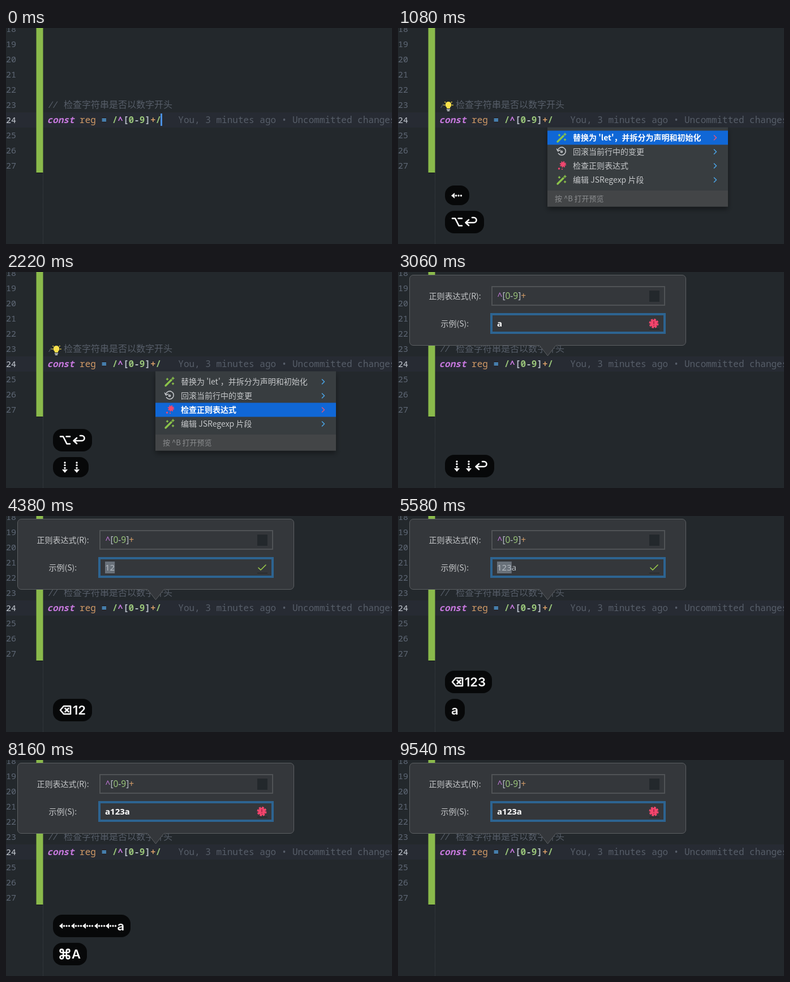
These frames come from a looping animation (682x384 px, 9.78 s). An HTML page:

```html
<!DOCTYPE html>
<html lang="zh-CN">
<head>
<meta charset="utf-8">
<style>
  html, body { margin: 0; width: 100%; height: 100%; overflow: hidden; background: #23282c; }
  #stage { position: absolute; left: 0; top: 0; display: block; }
  text { white-space: pre; font-family: "Noto Sans CJK SC", "Noto Sans CJK", "Noto Sans", sans-serif; font-size: 14px; fill: #c6c8ca; }
  .code text { font-family: "Noto Sans Mono", "Noto Sans CJK SC", "Noto Sans CJK", monospace; font-size: 16px; font-weight: 600; }
  .code text.num { font-size: 15px; font-weight: 500; fill: #5f6876; }
  .code text.current { fill: #c5cad2; }
  .code text.dim { fill: #575e69; font-weight: 400; }
  text.field { font-family: "Noto Sans", sans-serif; font-size: 15px; fill: #b4bac0; }
  .purple { fill: #c678dd; } .orange { fill: #d19a66; } .blue { fill: #56a8ea; }
  .green { fill: #98c379; } .plain { fill: #b4bac4; }
  .line { fill: none; stroke-width: 1.6; stroke-linecap: round; stroke-linejoin: round; }
  #keys { position: absolute; left: 83px; top: 0; height: 365px; display: flex; flex-direction: column;
    justify-content: flex-end; align-items: flex-start; gap: 10px; }
  .pill { display: flex; align-items: center; flex: none; box-sizing: border-box; padding: 0 11px; border-radius: 16px;
    background: #070809; color: #fff; font: 600 22px Inter, sans-serif; }
  .pill svg { display: block; overflow: visible; fill: none; stroke: #fff; stroke-width: 2.6; stroke-linejoin: round; stroke-linecap: round; }
  .pill svg .solid { fill: #fff; stroke: none; }
</style>
</head>
<body>
<svg id="stage" width="682" height="384" viewBox="0 0 682 384">
  <defs>
    <filter id="shadow" x="-10%" y="-10%" width="120%" height="130%">
      <feDropShadow dx="0" dy="5" stdDeviation="5" flood-color="#000" flood-opacity=".4"/>
    </filter>
    <g id="wand" class="line">
      <path d="M-7 7L3 -3" stroke-width="3.4"/>
      <path d="M-4 -6v3M-5.500 -4.500h3M6 -8v4M4 -6h4M6 2v3M4.500 3.500h3"/>
    </g>
  </defs>
  <rect width="682" height="384" fill="#23282c"/>
  <rect y="150" width="682" height="27" fill="#272b33"/>
  <path d="M65.500 257V384" stroke="#3b4146" stroke-dasharray="1 1"/>
  <rect x="53.500" width="12" height="257" fill="#8aba4b"/>
  <rect x="54" y="257" width="11" height="1" fill="#15181a"/>
  <g class="code">
    <g id="numbers"></g>
    <text class="dim" x="73" y="142"><tspan font-style="italic" letter-spacing="-1.500">//</tspan></text>
    <text class="dim" x="102" y="142">检查字符串是否以数字开头</text>
    <text x="72.500" y="169"><tspan class="purple" font-weight="700" font-style="italic">const</tspan><tspan class="orange" font-weight="500"> reg</tspan><tspan class="blue"> = </tspan><tspan class="green">/</tspan><tspan class="purple">^</tspan><tspan class="plain">[</tspan><tspan class="green">0</tspan><tspan class="plain">-</tspan><tspan class="green">9</tspan><tspan class="plain">]</tspan><tspan class="orange">+</tspan><tspan class="green">/</tspan></text>
    <text class="dim" x="304.300" y="169">You, 3 minutes ago • Uncommitted changes</text>
  </g>
  <rect id="caret" y="152" width="3" height="22" fill="#4a90e2"/>

  <g id="menu">
    <rect x="80" y="128" width="19" height="21" fill="#23282c"/>
    <path d="M89 131a5.500 5.500 0 0 1 3 10v2h-6v-2a5.500 5.500 0 0 1 3-10Z" fill="#fbe14c"/>
    <path d="M86.500 145h5M87.500 147.300h3" class="line" stroke="#d5d7d8"/>
    <path d="M81 137h1M96 137h1M83 131.500l.5.500M95 131.500l-.5.500" class="line" stroke="#fbe14c"/>
    <rect x="264" y="176.500" width="319" height="141" fill="#393c3f" filter="url(#shadow)"/>
    <rect x="264" y="289" width="319" height="28.500" fill="#434547"/>
    <rect id="selected" x="264" width="319" height="25" fill="#1067d6"/>
    <g id="items"></g>
    <use href="#wand" x="289" y="195" stroke="#8bc34a"/>
    <use href="#wand" x="289" y="270" stroke="#8bc34a"/>
    <g class="line" stroke="#c3c6c9">
      <path d="M282.500 217a7 7 0 1 1 1 6M280.500 215l2 4 4-2"/>
      <circle cx="289" cy="220" r="1.500"/>
    </g>
    <g fill="#f0476f">
      <circle cx="291.500" cy="242.500" r="4"/>
      <circle cx="291.500" cy="242.500" r="4.500" fill="none" stroke="#f0476f" stroke-width="2.500" stroke-dasharray="1.770"/>
      <circle cx="284.500" cy="250" r="1.700"/>
      <circle cx="290" cy="251" r="1.100"/>
    </g>
    <text x="277" y="308" style="font-size:13px;fill:#8b8d8f">按 ^B 打开预览</text>
  </g>

  <g id="dialog">
    <path d="M27 5.500H502a6.500 6.500 0 0 1 6.500 6.500V124a6.500 6.500 0 0 1-6.500 6.500H279L264.500 149L250 130.500H27a6.500 6.500 0 0 1-6.500-6.500V12a6.500 6.500 0 0 1 6.500-6.500Z" fill="#34373b" stroke="#5c5f62"/>
    <text x="54.500" y="48">正则表达式(R):</text>
    <text x="75.500" y="97">示例(S):</text>
    <rect x="166" y="26" width="305" height="33" fill="#34373b" stroke="#505356" stroke-width="2"/>
    <rect x="444" y="33" width="18" height="20" fill="#23282c"/>
    <text class="field" x="175.500" y="48" style="font-size:15.5px"><tspan class="purple">^</tspan><tspan class="plain">[</tspan><tspan class="green">0</tspan><tspan class="plain">-</tspan><tspan class="green">9</tspan><tspan class="plain">]</tspan><tspan class="orange">+</tspan></text>
    <rect x="165" y="75" width="306" height="33" fill="#34373b" stroke="#2d6491" stroke-width="4"/>
    <rect id="match" x="175" y="81" height="21" fill="#69717a"/>
    <text id="sample" class="field" x="175" y="97"></text>
    <rect id="sampleCaret" x="209" y="83" width="1.500" height="19" fill="#c5cad2"/>
    <path d="M444 101.500h18" stroke="#202326"/>
    <g id="error">
      <circle cx="452" cy="91.500" r="6.500" fill="#f2456c"/>
      <circle cx="452" cy="91.500" r="7" fill="none" stroke="#f2456c" stroke-width="3" stroke-dasharray="3.500 1.998"/>
      <path d="M452 88v4M452 95v.2" class="line" stroke="#9d2444" stroke-width="2"/>
    </g>
    <path id="check" d="M446 92l4 4 9-9" class="line" stroke="#9ccc4a"/>
  </g>
</svg>
<div id="keys"></div>

<script>
const LOOP = 9780, LIFE = 1800, FADE = 150;
const $ = id => document.getElementById(id);
const show = (id, on) => $(id).setAttribute('display', on ? 'inline' : 'none');

const icon = (width, body) => `<svg width="${width}" height="24" viewBox="0 -12 ${width} 24">${body}</svg>`;
const dots = points => points.map(([x, y]) => `<circle class="solid" cx="${x}" cy="${y}" r="1.7"/>`).join('');
const glyphs = {
  '←': icon(20.5, '<path class="solid" d="M0 0L6 -5V5Z"/>' + dots([[8.5, 0], [13, 0], [17.5, 0]])),
  '↓': icon(20.5, '<path class="solid" d="M5 4H15L10 10Z"/>' + dots([[10, -8], [10, -3.5], [10, 1.5]])),
  '↩': icon(24, '<path d="M14 -8h3a4.5 4.5 0 0 1 0 9H3M8 -4L2.5 1L8 6"/>'),
  '⌥': icon(23, '<path d="M2 -6.500h5l6.500 13h5.500M12.500 -6.500h6.500"/>'),
  '⌫': icon(24, '<path d="M8 -7H20V7H8L2 0ZM10.500 -3l6 6m0 -6l-6 6"/>'),
  '⌘': icon(22, '<path d="M7.200 -2.800H4.400a2.800 2.800 0 1 1 2.800 -2.800V5.600a2.800 2.800 0 1 1 -2.800 -2.800H15.600a2.800 2.800 0 1 1 -2.800 2.800V-5.600a2.800 2.800 0 1 1 2.800 2.800Z"/>')
};

// Each pill collects key presses: the key and the time it goes down.
const pills = [
  { '←': [400] },
  { '⌥': [840], '↩': [900] },
  { '↓': [1740, 1860], '↩': [2400] },
  { '⌫': [3420], '1': [4140], '2': [4380], '3': [4620] },
  { 'a': [5400] },
  { '←': [6120, 6300, 6420, 6540, 6720], 'a': [7060] },
  { '⌘': [7740], 'A': [7740] }
].map(keys => Object.entries(keys)
  .flatMap(([key, times]) => times.map(time => ({ key, time })))
  .sort((a, b) => a.time - b.time));

const samples = [[0, 'a'], [3420, ''], [4140, '1'], [4380, '12'], [4620, '123'], [5400, '123a'], [7060, 'a123a']];

function pillHeight(text) {
  return /^←+$/.test(text) ? 35 : /^↓+$/.test(text) ? 36 : 40;
}

function pillHtml(keys, t) {
  const pressed = keys.filter(k => k.time <= t);
  const left = pressed.length ? pressed.at(-1).time + LIFE - t : 0;
  if (left <= 0) return '';
  const text = pressed.map(k => k.key).join('');
  const body = text.replace(/[^\w]|\w+/g, part => glyphs[part] || `<span>${part}</span>`);
  return `<div class="pill" style="height:${pillHeight(text)}px;opacity:${Math.min(1, left / FADE).toFixed(2)}">${body}</div>`;
}

for (let n = 18; n <= 27; n++) {
  $('numbers').innerHTML += `<text class="num ${n === 24 ? 'current' : ''}" x="0" y="${169 + 27 * (n - 24)}">${n}</text>`;
}

const labels = ["替换为 'let'，并拆分为声明和初始化", '回滚当前行中的变更', '检查正则表达式', '编辑 JSRegexp 片段'];
$('items').innerHTML = labels.map((label, i) => {
  const y = 195 + 25 * i;
  return `<text x="309" y="${y + 5}">${label}</text><path class="line" d="M558.5 ${y - 4}l4 4 -4 4"/>`;
}).join('');
const itemTexts = [...$('items').querySelectorAll('text')];
const itemArrows = [...$('items').querySelectorAll('path')];

function drawMenu(t) {
  const open = t >= 1020 && t < 2400;
  show('menu', open);
  if (!open) return;
  const index = (t >= 1740) + (t >= 1860);
  $('selected').setAttribute('y', 182.5 + 25 * index);
  itemTexts.forEach((item, i) => {
    item.style.fontWeight = i === index ? 700 : 400;
    item.style.fill = i === index ? '#fff' : '';
  });
  itemArrows.forEach((arrow, i) => arrow.style.stroke = i === index ? '#e0577f' : '#4ba3e3');
}

function drawDialog(t) {
  show('dialog', t >= 2520);
  const text = samples.findLast(([time]) => time <= t)[1];
  const matched = (text.match(/^[0-9]+/) || [''])[0].length;
  const allSelected = t < 3420 || t >= 7740;
  const sample = $('sample');
  if (sample.textContent !== text) sample.textContent = text;
  sample.style.fontWeight = allSelected ? 600 : 400;
  sample.style.fill = allSelected ? '#fff' : '';
  $('match').setAttribute('width', matched * 8.6);
  show('error', !matched);
  show('check', matched);
  show('sampleCaret', t >= 5880 && t < 6120);
}

let lastKeys = '';
function draw(t) {
  show('caret', t < 1020);
  $('caret').setAttribute('x', t < 360 ? 273 : 264);
  drawMenu(t);
  drawDialog(t);
  const html = pills.map(keys => pillHtml(keys, t)).join('');
  if (html !== lastKeys) $('keys').innerHTML = lastKeys = html;
}

const start = performance.now();
function tick() {
  draw((performance.now() - start) % LOOP);
  requestAnimationFrame(tick);
}
tick();
</script>
</body>
</html>
```
